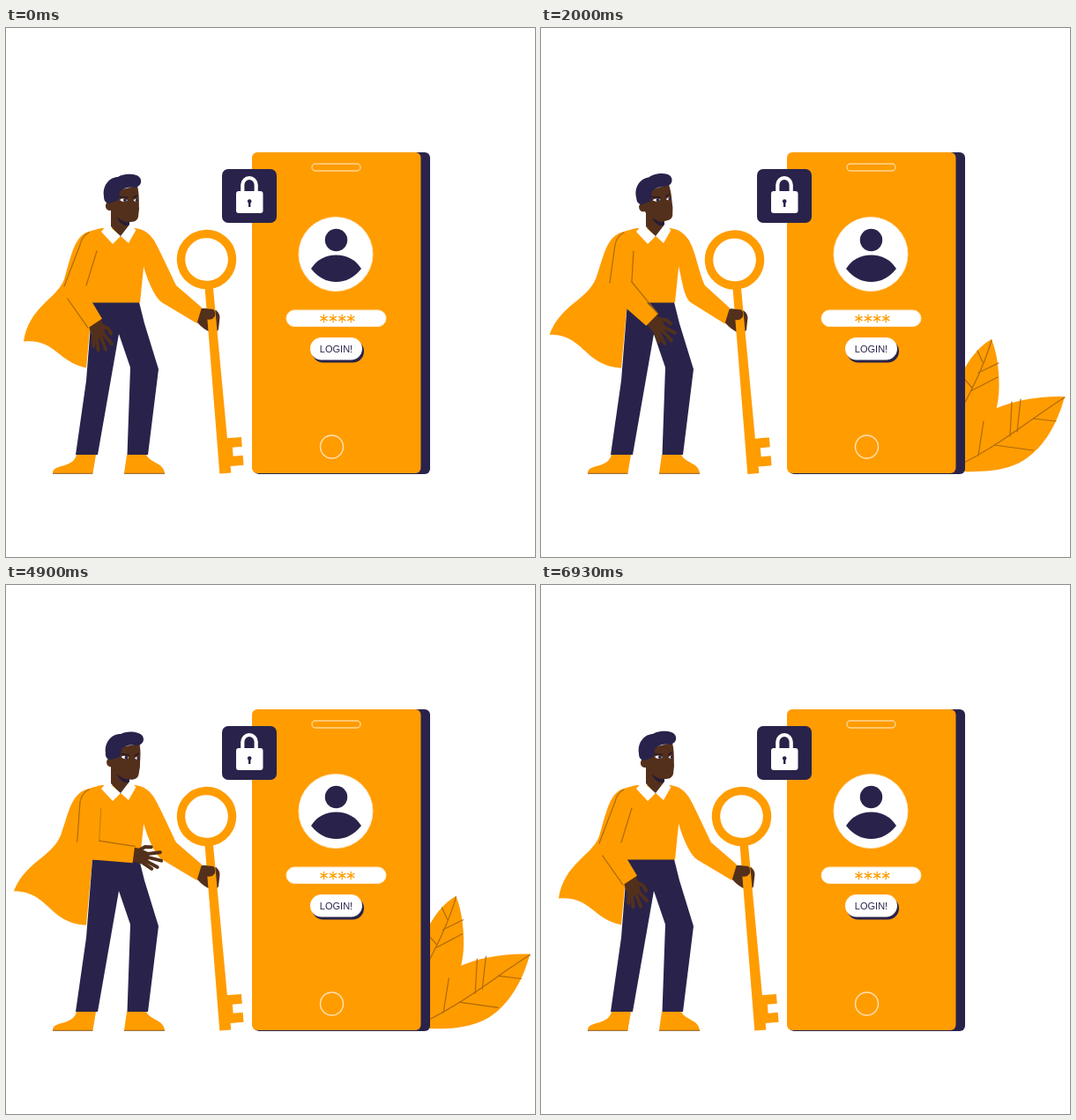
An HTML page for the animation above (7010 ms loop, 600 px wide and 600 px high).

```html
<!DOCTYPE html>
<html lang="en">
<head>
<meta charset="utf-8">
<title>Login</title>
<style>
  html, body { margin: 0; width: 100%; height: 100%; overflow: hidden; background: #fff; }
  svg { display: block; width: 100vw; height: 100vh; }
  .orange { fill: #ff9c00; }
  .navy { fill: #29234b; }
  .skin { fill: #53301c; }
  .white { fill: #fff; }
  .line { fill: none; stroke: #ad6a0c; stroke-width: 1.2; stroke-linecap: round; stroke-linejoin: round; }
  .finger { fill: none; stroke: #53301c; stroke-width: 4; stroke-linecap: round; }
  .pale { fill: none; stroke: #ffd692; stroke-width: 1.4; }
  .star { fill: none; stroke: #ff9c00; stroke-width: 1.3; }
  text { font: 11px "Liberation Sans", Arial, sans-serif; fill: #29234b; }
</style>
</head>
<body>
<svg viewBox="0 0 600 600">
  <g id="leafTall">
    <path class="orange" d="M511 353C497 361 486 375 478 391V500C505 470 519 440 519.500 408C520 388 517 368 511 353Z"/>
    <path class="line" d="M511 354Q502 386 478 430M496 391L519 380M487 412L518 396M489 408L481 399M501 379L495 366"/>
  </g>
  <g id="leafWide">
    <path class="orange" d="M594 418C564 417 535 423 517 431C500 440 486 456 478 474V503C508 504 530 501 548 490C571 475 586 448 594 418Z"/>
    <path class="line" d="M594 419C560 440 525 470 478 494M496 485L502 446M532 463L534 424M540 458L544 421M514 473L558 479M558 443L584 446"/>
  </g>

  <rect class="navy" x="400" y="141" width="81" height="365" rx="6"/>
  <rect class="navy" x="281" y="400" width="196" height="106" rx="6"/>
  <rect class="orange" x="279" y="141" width="191.500" height="364" rx="6"/>
  <rect class="pale" x="347" y="154" width="55" height="8" rx="4"/>
  <circle class="pale" cx="369.500" cy="475" r="13" style="stroke:#ffe2b4"/>
  <circle class="white" cx="374" cy="256.500" r="42" stroke="#ffe9c6"/>
  <circle class="navy" cx="374.500" cy="240.500" r="12.700"/>
  <path class="navy" d="M346 273Q356 257.500 374.500 257.500T403 273Q391 288 374.500 288T346 273Z"/>
  <rect class="white" x="318" y="320" width="113" height="18.500" rx="9.200" stroke="#ffe9c6"/>
  <g id="stars"></g>
  <g id="button">
    <rect class="navy" x="347" y="354" width="59" height="25.500" rx="12.700"/>
    <rect class="white" x="345" y="351" width="59" height="25.500" rx="12.700"/>
    <text x="374.500" y="368" text-anchor="middle">LOGIN!</text>
  </g>
  <g id="lock">
    <rect class="navy" x="245" y="160" width="62" height="61" rx="7"/>
    <path d="M268.300 187V178a7.700 8 0 0 1 15.400 0V187" fill="none" stroke="#fff" stroke-width="4.200"/>
    <rect class="white" x="261" y="185" width="30.500" height="25" rx="3"/>
    <path class="navy" d="M275 197h2.400v6h-2.400z"/>
    <circle class="navy" cx="276.200" cy="196.500" r="2.300"/>
  </g>

  <path id="cape" class="orange"/>
  <path class="navy" d="M98 311H151L157 335L173 387L161 484H137.500L141 385L128 347L104 484H79L91 400Z"/>
  <g class="orange">
    <path d="M80 484H102L98.500 505H53C53 494 76 500 80 484Z"/>
    <path d="M137 484H159C163 493 179 493 180 505H134Z"/>
  </g>
  <path d="M53 505.300H98.500M134 505.300H180" stroke="#8b5714" stroke-width="1"/>
  <path class="orange" d="M109 227C97 229 90 233 86 243L98 311.500H152L156 272L166 240C161 231 156 229 146 227Z"/>

  <g id="grip">
    <path class="skin" d="M-16 -13L-9 -14L3 -13Q10 -11 10.500 -4L9 10Q6 14 0 13Q-8 10 -15 2Z"/>
  </g>
  <g id="key">
    <circle r="29" fill="none" stroke="#ff9c00" stroke-width="9.400"/>
    <path class="orange" d="M-4.700 32H4.700L6 204H22V215H11V225H22V236H7V243.500H-6Z"/>
  </g>
  <path id="thumb" class="skin" d="M-14 -12L-8 -14L3 -13Q6 -11 5 -5L2 -2Q-3 0 -8 -3L-14 -3Z"/>
  <path id="farArm" class="orange"/>

  <path class="skin" d="M119 203V225L130 237L140 226V212Z"/>
  <path d="M125 213Q132 221 140 220V224Q130 226 125 213Z" fill="#281c36"/>
  <path class="white" d="M115 223L108 231L121 245L130 236L139 244L147.500 229L140 223L130 236Z"/>

  <g id="head">
    <path class="skin" d="M118 186L149 179C151.500 190 150.500 196 151 205L150 214C149 219 145 220 140 220C128 219 120 210 119 207C111 208 111 196 119 196Z"/>
    <path class="navy" d="M111 191C109 178 118 169 127 169C132 165 148 164 152 170C155 175 152 180 146 181C138 180 132 182 129 186C128 191 130 193 126 196L117 199C112 198 111 195 111 191Z"/>
    <path d="M129 195Q133 192 138 195.500Q133 198.500 129 195ZM144.500 195.500Q147 192.500 149.500 195Q147 198 144.500 195.500Z" fill="#fff"/>
    <circle class="navy" cx="134.800" cy="195.300" r="1.800"/>
    <circle class="navy" cx="148.300" cy="195.300" r="1.500"/>
    <path d="M129 191.500L138 192.500M144 192.500L149 190" stroke="#29182a" stroke-width="1.600"/>
  </g>

  <g id="hand">
    <path class="skin" d="M-3 -8L6 -8L15 -6Q20 0 16 7L8 9L-3 7Z"/>
    <path class="finger" d="M13 -3L29 -8M14 0L32 1M13 4L29 9M9 6L23 12M4 -5L11 -11L18 -12"/>
  </g>
  <path id="nearArm" class="orange"/>
  <path id="outerLine" class="line"/>
  <path id="innerLine" class="line"/>
  <path id="upperLine" class="line"/>
  <path id="lowerLine" class="line"/>
</svg>
<script>
const LOOP = 7010;
const el = id => document.getElementById(id);
const set = (id, name, value) => el(id).setAttribute(name, value);
const mix = (a, b, k) => a + (b - a) * k;
const clamp = v => Math.min(1, Math.max(0, v));
const smooth = v => { v = clamp(v); return v * v * (3 - 2 * v); };
// Single soft bump inside [from, to]
const bump = (v, from, to) => Math.sin(Math.PI * clamp((v - from) / (to - from))) ** 2;

// Eased values between rows of [time, ...values]
function track(rows, t) {
  let i = rows.length - 2;
  while (i > 0 && rows[i][0] > t) i--;
  const a = rows[i], b = rows[i + 1];
  const k = smooth((t - a[0]) / (b[0] - a[0]));
  return a.slice(1).map((v, n) => mix(v, b[n + 1], k));
}

const scaleAt = (x, y, s) => `translate(${x} ${y}) scale(${s}) translate(${-x} ${-y})`;

// x, y, tilt
const KEY = [
  [0, 227.5, 262.5, 4.9], [300, 227.5, 262.5, 4.9], [800, 228.3, 253, 5.5],
  [1250, 221.5, 253, 4.6], [1700, 219.5, 263, 4.9], [3200, 219.5, 263, 4.9],
  [3650, 221, 254, 5.4], [4050, 227.5, 254.8, 4.4], [4800, 227.5, 262.5, 4.9],
  [LOOP, 227.5, 262.5, 4.9]
];
const HEAD = [[0, 0], [1500, -5.5], [3200, -5.5], [4100, 3.5], [5900, 3.5], [6930, 0], [LOOP, 0]];
// elbow x, y, cuff x, y, hand angle, lower line, inner line
const ARM = [
  [0, 79, 301, 101, 335, 66, 1, 1], [700, 90, 297, 125, 332, 46, 0, 1],
  [2200, 91, 297, 126, 331, 45, 0, 1], [3000, 99, 300, 153, 302.5, 6, 0, 1],
  [4300, 99, 300, 155, 300, 8, 0, 1], [5600, 87, 298, 132, 313, 14, 0, 0],
  [6800, 79, 301, 101, 335, 66, 1, 1], [LOOP, 79, 301, 101, 335, 66, 1, 1]
];
// Cape outline at rest and fully blown
const CAPE = [
  [78, 232, 74, 258, 66, 285, 58, 307, 26, 316, 20, 355.5, 55, 352, 58, 378, 91, 385.5],
  [71, 234, 70, 258, 60, 283, 49, 310, 20, 312, 3, 343, 46, 345, 42, 386, 91, 386]
];

const STAR_X = [360.5, 371, 381.2, 391.2];
el('stars').innerHTML = STAR_X.map(() =>
  '<path class="star" d="M0 -5V5M-4.300 -2.500L4.300 2.500M-4.300 2.500L4.300 -2.500"/>').join('');
const stars = [...el('stars').children];

function drawLeaves(t, sway) {
  const grow = Math.min(smooth((t - 100) / 800), 1 - smooth((t - 6050) / 700));
  const place = (id, deg) =>
    set(id, 'transform', `translate(480 503) rotate(${deg}) scale(${grow}) translate(-480 -503)`);
  place('leafTall', 2.6 * (sway + 0.22));
  place('leafWide', -2.8 * (sway + 0.22));
}

function drawScreen(t) {
  const beat = t / 701 % 1, typing = t / (LOOP / 7) % 1;
  set('lock', 'transform', scaleAt(276, 190.5, 1 + 0.21 * bump(beat, 0, 0.6)));
  set('button', 'transform', scaleAt(375, 365, 1 - 0.11 * bump(typing, 0.5, 0.69)));
  stars.forEach((s, i) => {
    const from = 0.06 + i * 0.02;
    const k = 0.95 + 0.4 * bump(typing, from, from + 0.25);
    s.setAttribute('transform', `translate(${STAR_X[i]} 329.500) scale(${k})`);
  });
}

function drawKey(t) {
  const [x, y, tilt] = track(KEY, t);
  const hx = x + 4.5, hy = y + 69.5;
  const ex = 0.9 * (hx - 232) - 0.25 * (262.5 - y);
  set('key', 'transform', `translate(${x} ${y}) rotate(${-tilt})`);
  set('grip', 'transform', `translate(${hx} ${hy})`);
  set('thumb', 'transform', `translate(${hx} ${hy})`);
  set('farArm', 'd', `M145 227C158 228 164 235 168 241C176 255 ${186 + ex} 278 ${193 + ex} 292
    L${hx - 10} ${hy - 15}L${hx - 15.5} ${hy + 3}L${178 + ex} 312
    C${169 + ex} 307 160 285 156 270L140 250Z`);
}

function drawArm(t) {
  const [ex, ey, cx, cy, turn, low, inner] = track(ARM, t);
  const len = Math.hypot(cx - ex, cy - ey);
  const nx = (cy - ey) / len, ny = -(cx - ex) / len;
  const side = (x, y, w) => `${x + nx * w} ${y + ny * w}`;
  const left = ex - 13, right = ex + 11;
  set('nearArm', 'd', `M100 229C92 231 88 236 85 243L${left} ${ey - 8}
    Q${left} ${ey + 4} ${side(ex, ey, -12)}L${side(cx, cy, -9.5)}L${side(cx, cy, 9.5)}
    L${side(ex, ey, 11)}L${right} ${ey - 8}L112 250Z`);
  set('hand', 'transform', `translate(${cx} ${cy}) rotate(${turn})`);
  set('outerLine', 'd', `M94 232Q86 236 84 246L${left} ${ey - 8}`);
  set('innerLine', 'd', `M${Math.max(103, ex + 14)} 253L${right + 1} ${ey - 9}`);
  set('innerLine', 'opacity', inner);
  set('upperLine', 'd', `M${right + 1} ${ey - 9}L${side(cx, cy, 9.5)}`);
  set('upperLine', 'opacity', 1 - low);
  set('lowerLine', 'd', `M${side(ex, ey, -11)}L${side(cx, cy, -9.5)}`);
  set('lowerLine', 'opacity', low);
}

function draw(t) {
  const sway = Math.cos(2 * Math.PI * t / LOOP);
  const p = CAPE[0].map((v, i) => mix(v, CAPE[1][i], (1 - sway) / 2));
  set('cape', 'd', `M98 230C${p.join(' ')}L98 311L110 240Z`);
  set('head', 'transform', `rotate(${track(HEAD, t)[0]} 130 221)`);
  drawLeaves(t, sway);
  drawScreen(t);
  drawKey(t);
  drawArm(t);
}

// Steps alternate between 30 and 70 ms
function step(ms) {
  const t = ms % LOOP, base = Math.floor(t / 100) * 100;
  return Math.min(6930, base + (t - base >= 30 ? 30 : 0));
}

const start = performance.now();
function tick() {
  draw(step(performance.now() - start));
  requestAnimationFrame(tick);
}
tick();
</script>
</body>
</html>
```
